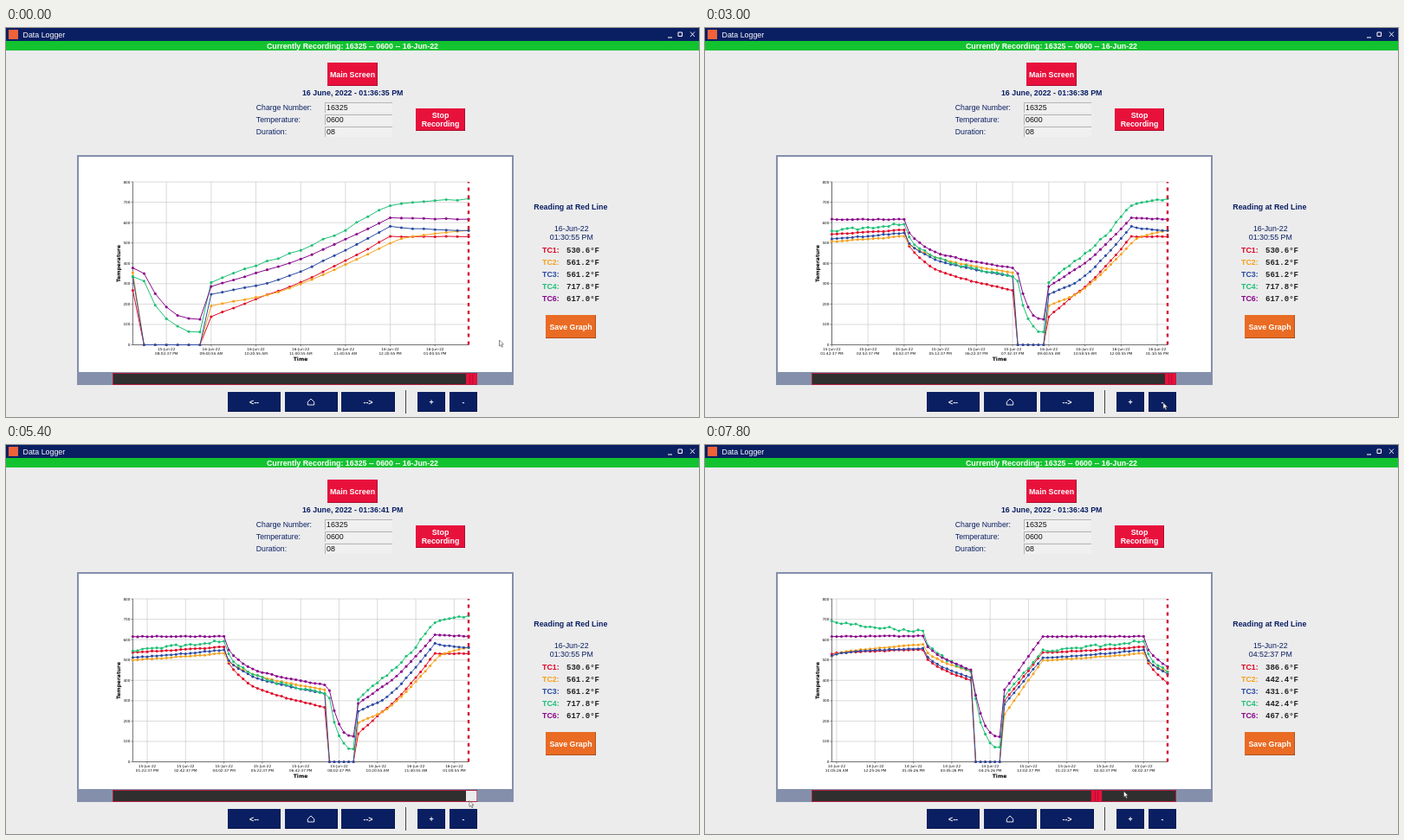
These frames come from a looping animation (800x450 px, 7.9 s). An HTML page with a canvas:

```html
<!DOCTYPE html>
<html lang="en">
<head>
<meta charset="utf-8">
<title>Data Logger</title>
<style>
html, body { margin: 0; width: 100%; height: 100%; overflow: hidden; background: #ececed; }
canvas { display: block; width: 800px; height: 450px; }
</style>
</head>
<body>
<canvas id="stage" width="800" height="450"></canvas>
<script>
const ctx = document.getElementById('stage').getContext('2d');
const LOOP = 7900;
const NAVY = '#0a1f62', RED = '#e8113c';
const SANS = '"Liberation Sans", Arial, sans-serif';
const MONO = '"Liberation Mono", "Courier New", monospace';
const PLOT = '"DejaVu Sans", sans-serif';

// Furnace cycle: each phase ends at an age (0 is the newest sample) with its own easing.
const TOTAL = 219;
const power = p => u => Math.pow(u, p);
const steady = power(1), settle = power(.5), cool = power(.7);
const vent = u => 1 - Math.pow(1 - u, 2.6);
const PHASES = [[116, steady], [97, settle], [87, settle], [81, vent], [80, steady], [72, steady],
  [51, power(1.3)], [46, settle], [29.2, cool], [24, vent], [23, steady], [18, steady],
  [7, power(1.2)], [0, settle]];

// Temperature at the end of every phase.
const channel = (name, color, noise, ...levels) => ({ name, color, noise, levels });
const channels = [
  channel('TC1', '#df0a26', 2, 530, 550, 401, 0, 299, 537, 564, 386.6, 265, 0, 138, 246.2, 533, 530.6),
  channel('TC2', '#f6a21b', 2, 516, 577, 445, 0, 233, 499, 533, 442.4, 352, 0, 191, 244.4, 499, 561.2),
  channel('TC3', '#2c4ca3', 2, 522, 558, 414, 0, 282, 511, 550, 431.6, 333, 0, 248, 302, 582, 561.2),
  channel('TC4', '#1fc077', 8, 698, 643, 443, 72, 320, 550, 592, 442.4, 335, 63, 306, 411.8, 683, 717.8),
  channel('TC6', '#8a098c', 2, 615, 618, 452, 123, 354, 615, 616, 467.6, 374, 125, 286, 368.6, 624, 617)
];

function jitter(seed) {
  const n = Math.sin(seed * 12.9898) * 43758.5453;
  return (n - Math.floor(n)) * 2 - 1;
}

function valueAt(ch, age) {
  const i = Math.max(1, PHASES.findIndex(p => p[0] <= age));
  const [end, ease] = PHASES[i], start = PHASES[i - 1][0];
  const from = ch.levels[i - 1], to = ch.levels[i];
  if (!to) return 0;
  const noise = age === end ? 0 : ch.noise * jitter(age + from);
  return from + (to - from) * ease((start - age) / (start - end)) + noise;
}

// Samples come every ten minutes in three sessions.
const two = n => String(n).padStart(2, '0');
function stamp(age) {
  const [day, start, sec, base] = age <= 24 ? [16, 810, 55, 0]
    : age <= 80 ? [15, 1222, 37, 25] : [14, 985, 26, 83];
  const m = start - (age - base) * 10, h = Math.floor(m / 60);
  return [`${day}-Jun-22`, `${two(h % 12 || 12)}:${two(m % 60)}:${two(sec)} ${h < 12 ? 'AM' : 'PM'}`];
}

// Zoom-out clicks at a steady beat, then one zoom-in click.
function samplesShown(t) {
  const clicks = Math.floor((t - 850) / 290);
  return 30 + 5 * Math.min(9, Math.max(0, clicks)) - (t > 4850 ? 5 : 0);
}

// Two clicks in the trough page the view back.
function scrollAt(t) {
  const page = t < 6000 ? 0 : t < 7050 ? 1 : 2;
  return { shift: page * 18 + (page > 1 ? 10 : 0), thumb: 531 - page * 42.6 };
}

// Pointer stops: arrival time and place.
const STOPS = [[0, 569.5, 361], [900, 529, 433.5], [4550, 504.5, 432.5], [5350, 535, 411.5],
  [5900, 486, 407], [7100, 483.5, 400.5]];
function pointerAt(t) {
  let [, x, y] = STOPS[0];
  for (const [at, sx, sy] of STOPS) {
    const u = Math.min(1, Math.max(0, (t - at) / 450 + 1));
    const e = at ? u * u * (3 - 2 * u) : 1;
    x += (sx - x) * e;
    y += (sy - y) * e;
  }
  return [x, y];
}

function box(x, y, w, h, fill) {
  ctx.fillStyle = fill;
  ctx.fillRect(x, y, w, h);
}

function path(points) {
  ctx.beginPath();
  points.forEach(p => ctx.lineTo(...p));
}

function line(x1, y1, x2, y2, color, width = 1) {
  ctx.strokeStyle = color;
  ctx.lineWidth = width;
  path([[x1, y1], [x2, y2]]);
  ctx.stroke();
}

function text(str, x, y, { color = NAVY, size = 8.85, bold = false, align = 'left', font = SANS } = {}) {
  ctx.font = `${bold ? 'bold ' : ''}${size}px ${font}`;
  ctx.fillStyle = color;
  ctx.textAlign = align;
  ctx.fillText(str, x, y);
}

const label = { bold: true, align: 'center', color: '#fff' };

function button(x, y, w, h, fill, ...lines) {
  box(x, y, w, h, fill);
  box(x, y + h - 1, w, 1, 'rgba(0,0,0,.25)');
  box(x + w - 1, y, 1, h, 'rgba(0,0,0,.25)');
  const top = y + h / 2 + 3 - (lines.length - 1) * 5;
  lines.forEach((s, i) => text(s, x + w / 2, top + i * 10, label));
}

function drawHeader(t) {
  box(0, 0, 800, 15, NAVY);
  box(3, 2, 11, 11, '#f0623a');
  text('Data Logger', 19.5, 10.5, { color: '#fff' });
  line(764, 11, 769, 11, '#fff');
  ctx.strokeRect(776, 5, 4.5, 4.5);
  line(790, 4.5, 795, 10, '#fff', .9);
  line(795, 4.5, 790, 10, '#fff', .9);
  box(0, 15, 800, 11, '#12c22f');
  text('Currently Recording: 16325 -- 0600 -- 16-Jun-22', 400, 23.6, label);

  button(371, 40, 58, 27, RED, 'Main Screen');
  const sec = 35 + Math.floor((t + 650) / 1000);
  text(`16 June, 2022 - 01:36:${sec} PM`, 400.2, 77.5, { bold: true, align: 'center' });
  [['Charge Number:', '16325'], ['Temperature:', '0600'], ['Duration:', '08']].forEach(([k, v], i) => {
    const y = 86 + i * 14;
    text(k, 288.8, y + 8.8, { size: 8.7 });
    box(368, y, 78, 12, '#f0f0f0');
    box(368, y, 78, 1, '#b4b4b4');
    box(368, y, 1, 12, '#b4b4b4');
    text(v, 370, y + 9, { color: '#111' });
  });
  button(473, 93, 57, 26, RED, 'Stop', 'Recording');
}

const LEFT = 146.4, RIGHT = 534, BASE = 366.5;
const yOf = v => BASE - v * .2356;

function drawAxes(count, shift, xOf) {
  const tick = { size: 4.2, font: PLOT, color: '#111' };
  for (let v = 0; v <= 800; v += 100) {
    const y = yOf(v);
    if (v) line(LEFT, y, RIGHT, y, '#c2c2c2', .6);
    line(LEFT - 2, y, LEFT, y, '#222', .5);
    text(v, LEFT - 3, y + 1.5, { ...tick, align: 'right' });
  }
  const step = Math.ceil((count + 1) / 10);
  for (let age = shift + count; age >= shift; age--) {
    if ((TOTAL - age) % step) continue;
    const x = xOf(age);
    line(x, yOf(800), x, BASE, '#c2c2c2', .6);
    line(x, BASE, x, BASE + 2, '#222', .5);
    stamp(age).forEach((s, i) => text(s, x, 372.8 + i * 5, { ...tick, align: 'center' }));
  }
  line(LEFT, yOf(800), LEFT, BASE, '#333', .7);
  line(LEFT, BASE, RIGHT, BASE, '#333', .7);

  const title = { size: 6, font: PLOT, bold: true, align: 'center', color: '#000' };
  text('Time', 340, 384.6, title);
  ctx.save();
  ctx.translate(132.2, 272.5);
  ctx.rotate(-Math.PI / 2);
  text('Temperature', 0, 0, title);
  ctx.restore();
}

function drawChart(count, shift) {
  box(82, 147, 504, 266, '#8490ab');
  box(84, 149, 500, 249, '#fff');

  const xOf = age => RIGHT - (age - shift) * (RIGHT - LEFT) / count;
  drawAxes(count, shift, xOf);

  const ages = Array.from({ length: count + 1 }, (_, i) => shift + count - i);
  for (const ch of channels) {
    const points = ages.map(age => [xOf(age), yOf(valueAt(ch, age))]);
    ctx.strokeStyle = ctx.fillStyle = ch.color;
    ctx.lineWidth = 1;
    ctx.lineJoin = 'round';
    path(points);
    ctx.stroke();
    for (const [x, y] of points) {
      ctx.beginPath();
      ctx.arc(x, y, 1.55, 0, Math.PI * 2);
      ctx.fill();
    }
  }

  ctx.setLineDash([4, 4.9]);
  line(RIGHT, BASE, RIGHT, yOf(800), '#d30b2e', 2.4);
  ctx.setLineDash([]);
}

function drawReadings(age) {
  const mid = { align: 'center' };
  text('Reading at Red Line', 651.8, 210.2, { ...mid, bold: true });
  stamp(age).forEach((s, i) => text(s, 652.8, 235 + i * 10, mid));
  channels.forEach((ch, i) => {
    const y = 259.6 + i * 14.1;
    text(ch.name + ':', 619, y, { color: ch.color, bold: true });
    text(valueAt(ch, age).toFixed(1) + '°F', 647, y, { color: '#222', size: 9.05, font: MONO, bold: true });
  });
  button(623, 332, 58, 27, '#ea6b23', 'Save Graph');
}

function drawControls(thumb, hover) {
  box(123, 399, 421, 14, '#b3203f');
  box(124, 400, 419, 12, '#2f2f2f');
  box(thumb, 400, 12.4, 12, hover ? '#ececec' : RED);
  if (!hover) {
    for (const dx of [4.6, 7.8]) line(thumb + dx, 400.5, thumb + dx, 411.5, '#a00c2a', .7);
  }
  button(256, 421, 61, 23, NAVY, '<--');
  button(322, 421, 61, 23, NAVY);
  button(387, 421, 62, 23, NAVY, '-->');
  button(475, 421, 32, 23, NAVY, '+');
  button(512, 421, 32, 23, NAVY, '-');
  line(461.5, 419, 461.5, 446, '#333', .9);

  ctx.strokeStyle = '#fff';
  ctx.lineWidth = .9;
  path([[348.3, 436], [348.3, 432.6], [352, 429], [355.7, 432.6], [355.7, 436]]);
  ctx.closePath();
  ctx.stroke();
}

function drawPointer(x, y) {
  ctx.save();
  ctx.translate(x, y);
  path([[0, 0], [0, 7], [1.6, 5.5], [2.8, 8.2], [3.9, 7.7], [2.8, 5.1], [4.9, 5]]);
  ctx.closePath();
  ctx.fillStyle = '#fff';
  ctx.strokeStyle = '#444';
  ctx.lineWidth = .6;
  ctx.fill();
  ctx.stroke();
  ctx.restore();
}

function render(now) {
  const t = now % LOOP;
  const { shift, thumb } = scrollAt(t);
  const [px, py] = pointerAt(t);
  const hover = Math.abs(px - thumb - 6) < 9 && py > 399 && py < 412.5;

  box(0, 0, 800, 450, '#ececed');
  drawHeader(t);
  drawChart(samplesShown(t), shift);
  drawReadings(shift);
  drawControls(thumb, hover);
  drawPointer(px, py);
}

const began = performance.now();
function loop() {
  render(performance.now() - began);
  requestAnimationFrame(loop);
}
loop();
</script>
</body>
</html>
```
